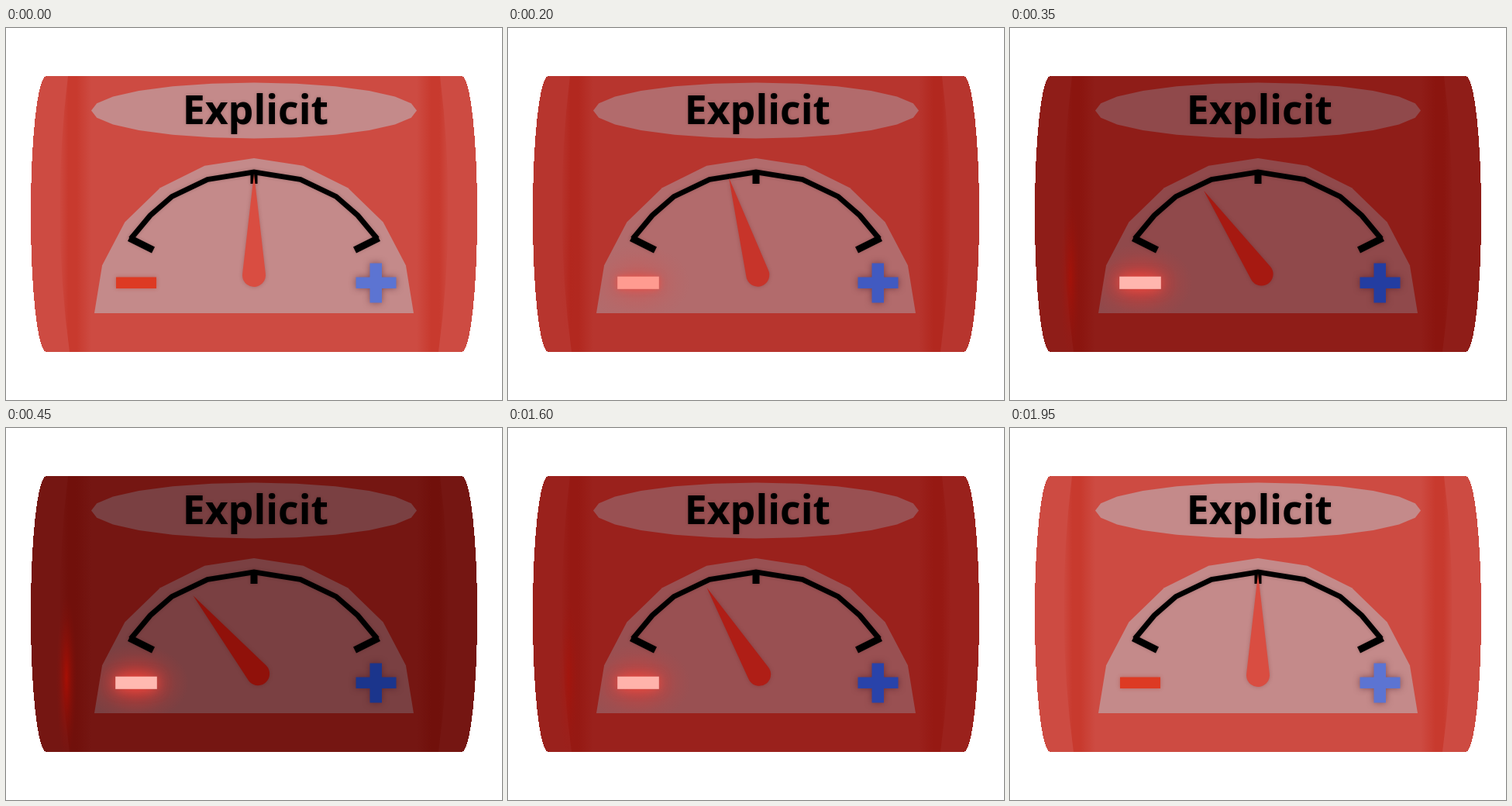
Recreate the animation shown at these times as an HTML page with a canvas. Size 640 by 480 pixels, loop 2000 ms.

```html
<!DOCTYPE html>
<html lang="en">
<head>
<meta charset="utf-8">
<title>Gauge</title>
<style>
  html, body { margin: 0; width: 100%; height: 100%; overflow: hidden; background: #fff; }
  canvas { display: block; }
</style>
</head>
<body>
<canvas id="stage" width="640" height="480"></canvas>
<script>
const ctx = document.getElementById('stage').getContext('2d');
const LOOP = 2000, STEP = 50, SWING = 39.7 * Math.PI / 180;

// Each surface from full light to dimmed
const COLORS = {
  body: [[205, 75, 66], [117, 22, 18]],
  band: [[200, 58, 46], [113, 16, 11]],
  panel: [[196, 138, 138], [122, 64, 66]],
  needle: [[217, 77, 65], [144, 17, 10]],
  plus: [[92, 116, 210], [27, 53, 140]]
};

const ease = x => x * x * (3 - 2 * x);
const mix = (a, b, f) => a + (b - a) * f;
const rgb = c => `rgb(${c.map(Math.round).join()})`;

// The strongest channel saturates, so it falls late; the others fall evenly
const falloff = x => (1 - (1 - 0.97 * x) ** 0.4) / (1 - 0.03 ** 0.4);

function shade(name, dim) {
  const [light, dark] = COLORS[name];
  const peak = Math.max(...light);
  return rgb(light.map((v, i) => mix(v, dark[i], v === peak ? falloff(dim) : dim)));
}

// The lamp brightens fast and then levels off
function lampColor(dim) {
  const f = 1 - Math.exp(-3.2 * dim);
  return rgb([Math.min(255, mix(221, 275, f)), mix(58, 190, f), mix(35, 183, f)]);
}

function dimAt(ms) {
  const k = Math.floor(ms % LOOP / STEP);
  if (k < 9) return ease(k / 9);
  return k < 30 ? 1 : 1 - ease((k - 29) / 10);
}

function ring(rx, ry, cy, sides, count = sides) {
  return Array.from({ length: count }, (_, i) => {
    const a = i * 2 * Math.PI / sides;
    return [320 + rx * Math.cos(a), cy - ry * Math.sin(a)];
  });
}

function toPath(points, close) {
  const p = new Path2D();
  points.forEach(([x, y]) => p.lineTo(x, y));
  if (close) p.closePath();
  return p;
}

// Hard-edged rows with elliptical ends
function bodyPath() {
  const p = new Path2D();
  for (let y = 62; y < 418; y++) {
    const t = (y + 0.5 - 240) / 178;
    const x = Math.round(52 - 20 * Math.sqrt(1 - t * t));
    p.rect(x, y, 640 - 2 * x, 1);
  }
  return p;
}

const half = [[161, 272], [186, 242], [214, 217.5], [260, 195.5], [320, 186]];
const flip = ([x, y]) => [640 - x, y];
const stub = [[159, 271], [190, 286.5]];

const BODY = bodyPath();
const PLATE = toPath(ring(210, 36, 106.5, 24), true);
const DIAL = toPath(ring(206, 200, 368, 20, 11), true);
const SCALE = toPath([...half, ...half.map(flip).reverse()]);
const MARKS = [stub, stub.map(flip), [[320, 184], [320, 201]]].map(m => toPath(m));

function layer(paint) {
  ctx.save();
  paint();
  ctx.restore();
}

function shadow(color, blur) {
  ctx.shadowColor = color;
  ctx.shadowBlur = blur;
}

// Soft elliptical light that fades from its centre
function glow(x, y, rx, ry, color, alpha) {
  layer(() => {
    ctx.translate(x, y);
    ctx.scale(rx, ry);
    const g = ctx.createRadialGradient(0, 0, 0, 0, 0, 1);
    for (let r = 0; r <= 1; r += 0.25) g.addColorStop(r, `rgba(${color},${alpha * (1 - r) ** 1.6})`);
    ctx.fillStyle = g;
    ctx.fillRect(-1, -1, 2, 2);
  });
}

function drawBand(dim, side) {
  layer(() => {
    ctx.translate(320, 0);
    ctx.scale(side, 1);
    const g = ctx.createLinearGradient(-252, 0, -210, 0);
    const color = shade('band', dim);
    const clear = color.replace('rgb', 'rgba').replace(')', ',0)');
    g.addColorStop(0, clear);
    g.addColorStop(0.3, color);
    g.addColorStop(0.55, color);
    g.addColorStop(1, clear);
    ctx.fillStyle = g;
    ctx.beginPath();
    ctx.moveTo(-240, 62);
    ctx.quadraticCurveTo(-262, 240, -238, 418);
    ctx.lineTo(-208, 418);
    ctx.lineTo(-208, 62);
    ctx.fill();
  });
}

function drawBody(dim) {
  layer(() => {
    ctx.fillStyle = shade('body', dim);
    ctx.fill(BODY);
    ctx.clip(BODY);
    drawBand(dim, 1);
    drawBand(dim, -1);
    glow(78, 322, 13, 105, '185,14,2', 0.75 * dim ** 3);
  });
}

function drawLabel() {
  layer(() => {
    shadow('rgba(40,0,0,0.2)', 4);
    ctx.fillStyle = '#000';
    ctx.font = 'bold 51.8px "Open Sans", "Noto Sans", sans-serif';
    ctx.textAlign = 'center';
    ctx.fillText('Explicit', 321.8, 124);
  });
}

function drawMinus(dim) {
  const grow = Math.min(1, dim * 3) * 0.8;
  layer(() => {
    ctx.clip(DIAL);
    glow(168, 329, 68, 50, '255,50,40', 0.75 * dim);
  });
  layer(() => {
    ctx.fillStyle = lampColor(dim);
    shadow(`rgba(${mix(170, 255, grow)},${mix(50, 90, grow)},${mix(40, 80, grow)},${mix(0.45, 1, grow)})`, 5 + 11 * dim);
    ctx.fillRect(142 - grow, 321.5 - grow, 52 + 2 * grow, 14.5 + 2 * grow);
  });
}

function drawPlus(dim) {
  layer(() => {
    shadow('rgba(65,15,30,0.5)', 9);
    ctx.fillStyle = shade('plus', dim);
    ctx.beginPath();
    ctx.rect(469.5, 303.5, 15.5, 51);
    ctx.rect(451.5, 321.5, 52, 14.5);
    ctx.fill();
  });
}

function drawScale() {
  layer(() => {
    shadow('rgba(40,0,0,0.2)', 4);
    ctx.lineWidth = 6.8;
    ctx.stroke(SCALE);
    ctx.lineWidth = 9;
    MARKS.forEach(m => ctx.stroke(m));
  });
}

function drawNeedle(dim) {
  const lean = Math.asin(15 / 131);
  layer(() => {
    ctx.translate(320, 311);
    ctx.rotate(-SWING * dim);
    shadow('rgba(90,0,0,0.25)', 5);
    ctx.fillStyle = shade('needle', dim);
    ctx.beginPath();
    ctx.moveTo(0, -123);
    ctx.arc(0, 8, 15, -lean, Math.PI + lean);
    ctx.fill();
  });
}

function draw(dim) {
  ctx.clearRect(0, 0, 640, 480);
  drawBody(dim);
  ctx.fillStyle = shade('panel', dim);
  ctx.fill(PLATE);
  ctx.fill(DIAL);
  drawLabel();
  drawMinus(dim);
  drawPlus(dim);
  drawScale();
  drawNeedle(dim);
}

function tick() {
  draw(dimAt(performance.now()));
  requestAnimationFrame(tick);
}
tick();
</script>
</body>
</html>
```
